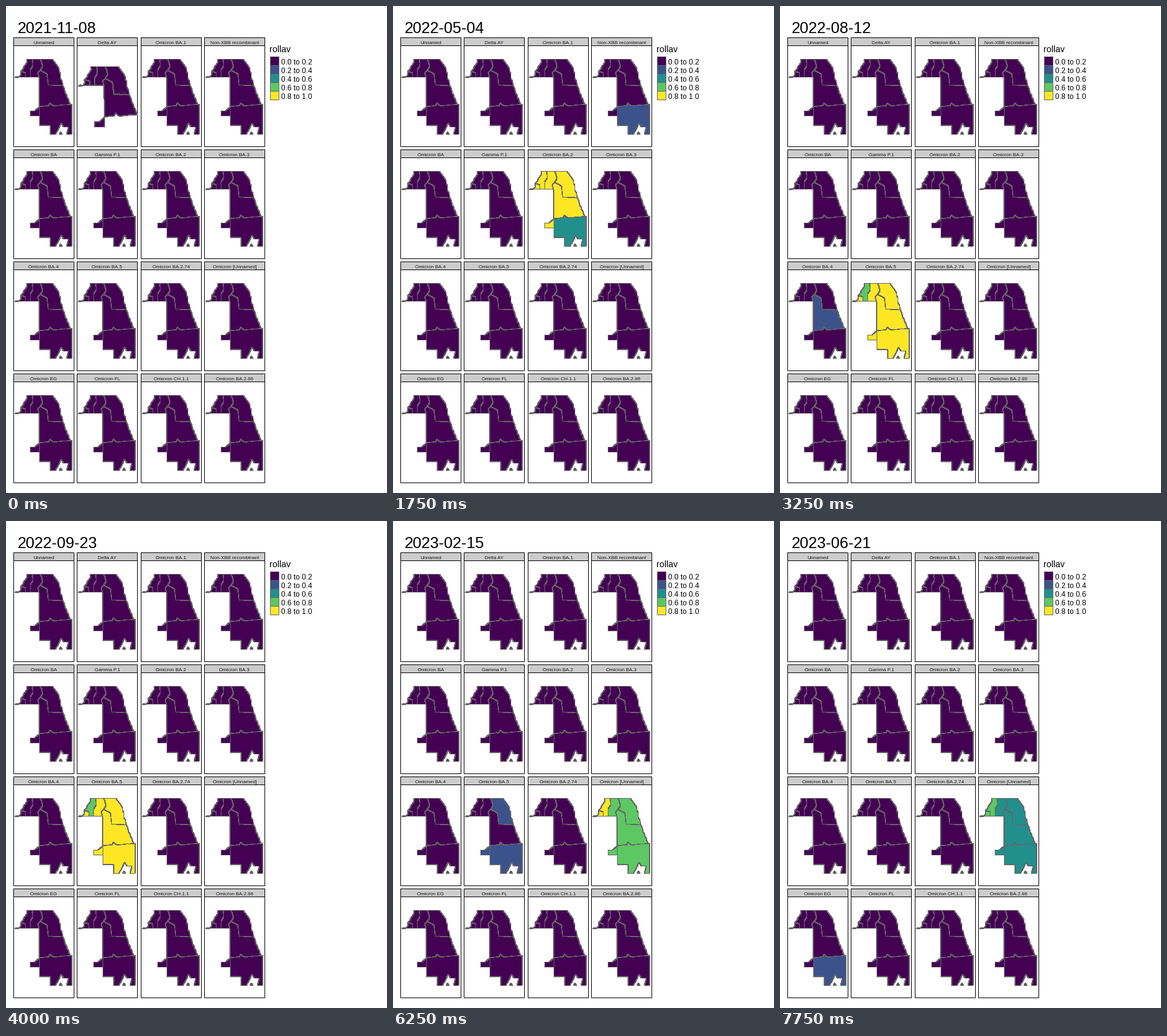
These frames come from a looping animation (619 by 791 pixels, 8000 ms). A matplotlib script:

```python
import numpy as np
import matplotlib.pyplot as plt
from matplotlib.animation import FuncAnimation
from matplotlib.collections import PolyCollection
from matplotlib.patches import Rectangle

W, H, DPI = 619, 791, 64
PX = 72 / DPI  # one pixel in points
FRAMES, STEP_MS = 32, 250
COLORS = ["#440154", "#3B528B", "#21908C", "#5DC863", "#FDE725"]
EDGE = "#666666"
rng = np.random.default_rng(4)

TITLES = [
    "Unnamed", "Delta AY", "Omicron BA.1", "Non-XBB recombinant",
    "Omicron BA", "Gamma P.1", "Omicron BA.2", "Omicron BA.3",
    "Omicron BA.4", "Omicron BA.5", "Omicron BA.2.74", "Omicron [Unnamed]",
    "Omicron EG", "Omicron FL", "Omicron CH.1.1", "Omicron BA.2.86",
]

# Dates at key steps; the steps between are evenly spaced.
KEY_DATES = {0: "2021-11-08", 3: "2022-02-28", 7: "2022-05-04", 10: "2022-07-01",
             16: "2022-09-23", 25: "2023-02-15", 31: "2023-06-21"}
KEY_DAYS = np.array(list(KEY_DATES.values()), dtype="datetime64[D]").astype(int)

# Each wave: variant, districts, step of rise, step of fall, peak share.
WAVES = [
    ("Delta AY", "abcneps", 0.6, 1.8, 1),
    ("Omicron BA.1", "abces", 1.6, 4.6, 1),
    ("Omicron BA.1", "p", 1.6, 4.6, 0.75),
    ("Omicron BA.1", "n", 1.6, 4.6, 0.55),
    ("Omicron BA", "n", 2, 4.6, 0.5),
    ("Omicron BA.2", "acnep", 4.7, 9.5, 1),
    ("Omicron BA.2", "b", 4.7, 9.3, 1),
    ("Omicron BA.2", "s", 7, 9.3, 1),
    ("Non-XBB recombinant", "s", 6.5, 7.5, 0.5),
    ("Omicron BA.4", "e", 12.5, 13.5, 0.5),
    ("Omicron BA.5", "ace", 9.6, 24, 1),
    ("Omicron BA.5", "ns", 9.6, 24.6, 1),
    ("Omicron BA.5", "p", 9.9, 24.6, 1),
    ("Omicron BA.5", "b", 9, 24, 0.78),
    ("Omicron BA.5", "b", 17.5, 23, 0.2),
    ("Omicron [Unnamed]", "ab", 23.5, 31.5, 0.9),
    ("Omicron [Unnamed]", "cneps", 23.5, 31.5, 0.75),
    ("Omicron FL", "p", 28.5, 29.5, 0.5),
    ("Omicron EG", "s", 30.5, 40, 0.5),
]


def sigmoid(x):
    return 1 / (1 + np.exp(-x / 0.4))


def level(title, key, i):
    share = sum(peak * sigmoid(i - rise) * sigmoid(fall - i)
                for name, keys, rise, fall, peak in WAVES
                if name == title and key in keys)
    return min(int(5 * share), 4)


def date_at(i):
    days = np.interp(i, list(KEY_DATES), KEY_DAYS)
    return str(np.datetime64(int(round(days)), "D"))


def rough(*points, amp=0.7):
    """Polyline through the points with small seeded jags between them."""
    line = [points[0]]
    for p, q in zip(points, points[1:]):
        n = max(1, int(np.hypot(q[0] - p[0], q[1] - p[1]) // 4))
        for t in np.arange(1, n) / n:
            jag = rng.uniform(-amp, amp, 2)
            line.append(tuple(np.round(np.add(p, np.subtract(q, p) * t) + jag)))
        line.append(q)
    return line


# Shared borders, in pixels of the first panel.
AB = rough((23, 106), (31, 108), (31, 115))
BC = rough((42, 86), (43, 97), (39, 103), (39, 115))
CN = rough((55, 86), (59, 98), (55, 104))
CE = rough((55, 104), (51, 108), (53, 115))
NE = rough((55, 104), (66, 110), (68, 128), (92, 129))
ES = rough((54, 163), (69, 161), (71, 157), (78, 162), (104, 159))
NW_EDGE = rough((33, 86), (31, 95), (23, 106), amp=2)
N_SHORE = rough((75, 86), (84, 98), (92, 129))
E_SHORE = rough((92, 129), (104, 159))
S_EDGE = [(107, 160), (106, 208), (98, 208), (101, 196), (93, 196), (89, 190),
          (85, 199), (80, 208), (72, 208), (71, 194), (54, 193)]

# District key -> polygons that share one value.
DISTRICTS = {
    "a": [AB + [(21, 115), (24, 110)], [(14, 116), (17, 114), (20, 115)]],
    "b": [BC + AB[::-1] + NW_EDGE[::-1]],
    "c": [BC[::-1] + CN + CE],
    "n": [CN + NE + N_SHORE[::-1]],
    "e": [CE[::-1] + NE + E_SHORE + ES[::-1]],
    "p": [[(39, 170), (46, 170), (54, 163), (54, 178), (39, 178)]],
    "s": [ES + S_EDGE, [(86, 208), (88, 204), (91, 208)]],
}
KEYS = [k for k, polys in DISTRICTS.items() for _ in polys]
SHAPES = [np.array(poly, float) for polys in DISTRICTS.values() for poly in polys]

plt.rcParams["font.family"] = "Liberation Sans"
fig = plt.figure(figsize=(W / DPI, H / DPI), dpi=DPI, facecolor="white")
ax = fig.add_axes([0, 0, 1, 1])
ax.set_xlim(0, W)
ax.set_ylim(H, 0)
ax.axis("off")


def box(x, y, w, h, face, edge="black"):
    ax.add_patch(Rectangle((x + 0.5, y + 0.5), w, h, facecolor=face,
                           edgecolor=edge, linewidth=PX, snap=False))


def label(x, y, text, size, **kw):
    return ax.text(x, y, text, fontsize=size * PX, va="baseline", **kw)


def panel_offset(k):
    return round(103.35 * (k % 4)), 182 * (k // 4)


def place(k):
    # Half a pixel more puts each outline on pixel centres.
    return [s + panel_offset(k) + 0.5 for s in SHAPES]


maps = {}
for k, name in enumerate(TITLES):
    dx, dy = panel_offset(k)
    box(12 + dx, 51 + dy, 98, 177, "white")
    box(12 + dx, 51 + dy, 98, 13, "#CCCCCC")
    label(61.3 + dx, 62 + dy, name, 8, ha="center", color="#1A1A1A")
    maps[name] = PolyCollection(place(k), edgecolors=EDGE, linewidths=0.95 * PX,
                                antialiaseds=False, snap=False)
    ax.add_collection(maps[name], autolim=False)

label(428, 75, "rollav", 14.3)
for k, color in enumerate(COLORS):
    box(429, 82 + 14 * k, 14, 14, color, EDGE)
    label(447, 95 + 14 * k, f"{k * 0.2:.1f} to {k * 0.2 + 0.2:.1f}", 12)
heading = label(18.5, 44, "", 25.4)

# Without the south the map is fitted again, a little larger.
NO_SOUTH = [(s - (14, 86)) * 1.065 + (117.5, 98.5)
            for s, k in zip(SHAPES, KEYS) if k != "s"]


def draw(i):
    heading.set_text(date_at(i))
    for name, shape in maps.items():
        shape.set_facecolor([COLORS[level(name, k, i)] for k in KEYS])
    maps["Delta AY"].set_verts(NO_SOUTH if i == 0 else place(1))
    return [heading, *maps.values()]


anim = FuncAnimation(fig, draw, frames=FRAMES, interval=STEP_MS, repeat=True)
plt.show()
```
